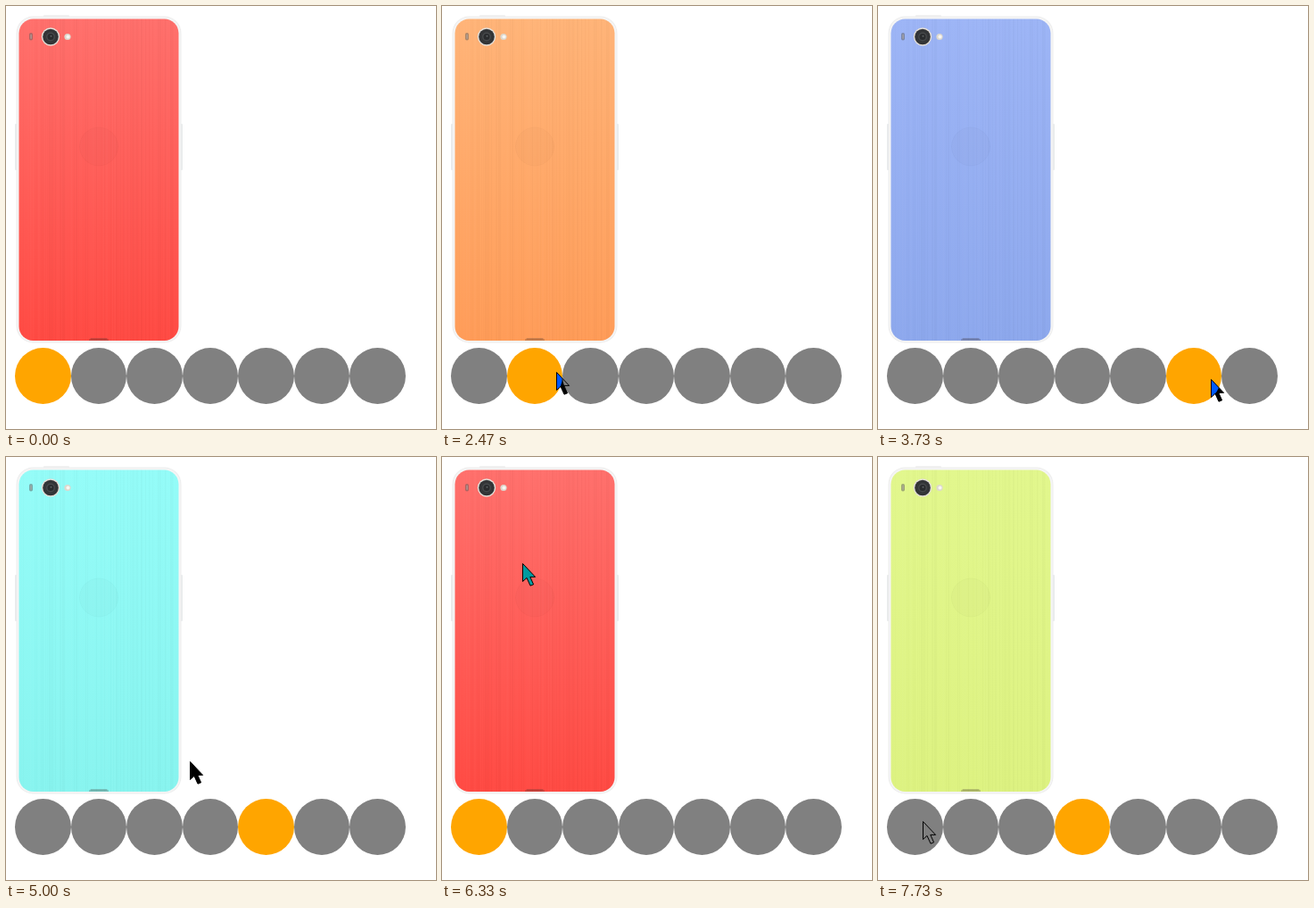
Write an HTML page with a canvas that moves like this. It is 482 px wide and 474 px high and loops after 8 s.

```html
<!DOCTYPE html>
<html lang="en">
<head>
<meta charset="utf-8">
<title>Phone colours</title>
<style>
  html, body { margin: 0; width: 100%; height: 100%; overflow: hidden; background: #fff; }
  canvas { display: block; }
</style>
</head>
<body>
<canvas id="stage" width="482" height="474"></canvas>
<script>
const ctx = document.getElementById('stage').getContext('2d');
const LOOP = 8000, FPS = 15, TICKS = LOOP * FPS / 1000;

// Back cover: top colour, bottom colour
const covers = [
  ['#ff706c', '#ff4a43'],
  ['#ffb478', '#ff9c58'],
  ['#ffdb76', '#ffd362'],
  ['#e2f78d', '#ddf281'],
  ['#94fcf8', '#88f4ef'],
  ['#9db5f6', '#8da8ed'],
  ['#cfaaf2', '#b892e6']
];

const clicks = [
  { at: 0, index: 0 },
  { at: 37, index: 1 },
  { at: 45, index: 2 },
  { at: 56, index: 5 },
  { at: 68, index: 4 }
];
const slideshow = { from: 85.3, every: 4.4, steps: 6 };

// The pointer enters here and eases from one stop to the next
const entry = { at: 14, x: 154, y: 452 };
const moves = [
  { from: 14, to: 17, x: 73, y: 200 },
  { from: 17, to: 20, x: 101, y: 37 },
  { from: 20, to: 31.4, x: 128, y: 410 },
  { from: 37, to: 41, x: 166, y: 411 },
  { from: 45, to: 52, x: 373, y: 418 },
  { from: 57, to: 62, x: 223, y: 423 },
  { from: 62, to: 65, x: 261, y: 417 },
  { from: 71, to: 75, x: 206, y: 341 },
  { from: 75, to: 83, x: 90, y: 119 },
  { from: 107, to: 116, x: 50, y: 408 }
];

const arrow = new Path2D('M.5 .5V20.5L5 16.4 9 25.2 12.6 23.8 8.8 15.4H14.6Z');
const clamp = (v, min, max) => Math.min(max, Math.max(min, v));
const smooth = k => k * k * (3 - 2 * k);

function rounded(x, y, w, h, r, fill) {
  ctx.beginPath();
  ctx.roundRect(x, y, w, h, r);
  ctx.fillStyle = fill;
  ctx.fill();
}

function oval(x, y, rx, ry, fill) {
  ctx.beginPath();
  ctx.ellipse(x, y, rx, ry, 0, 0, Math.PI * 2);
  ctx.fillStyle = fill;
  ctx.fill();
}

const disc = (x, y, r, fill) => oval(x, y, r, r, fill);

function drawGrooves() {
  for (let x = 15; x < 193; x++) {
    const noise = Math.abs(Math.sin(x * 12.9898) * 43758.5453) % 1 - 0.5;
    const tone = noise < 0 ? 0 : 255;
    ctx.fillStyle = `rgba(${tone},${tone},${tone},${Math.abs(noise) * 0.04})`;
    ctx.fillRect(x, 14, 1, 362);
  }
}

function drawCamera() {
  disc(50, 34.5, 10.2, '#e4dfd8');
  disc(50, 34.5, 8.8, '#333537');
  disc(50, 34.5, 5, '#45484a');
  disc(50, 34.5, 3.5, '#292b2d');
  disc(50.5, 33.8, 1, '#5c6062');
  disc(69, 34.5, 3.6, '#ddd8ce');
  disc(69.5, 34.5, 2, '#f8f6f2');
  rounded(26, 30, 4, 8.5, 2, 'rgba(90,90,90,.5)');
  rounded(27.2, 31.5, 1.8, 5.5, 1, 'rgba(180,170,165,.6)');
}

function drawPhone([top, bottom]) {
  rounded(42, 10, 29, 4, 1, '#f1f1f1');
  rounded(10, 132, 3, 52, 1, '#e9ebec');
  rounded(195, 132, 3, 52, 1, '#e9ebec');
  rounded(11.5, 11.5, 185, 366, 19, '#ededed');
  rounded(12.5, 12.5, 183, 364, 18, '#f5f5f5');

  const shade = ctx.createLinearGradient(0, 14, 0, 375);
  shade.addColorStop(0, top);
  shade.addColorStop(1, bottom);
  ctx.save();
  rounded(14.5, 14.5, 179, 360.5, 16, shade);
  ctx.clip();
  drawGrooves();
  ctx.restore();

  disc(104, 157.5, 21.5, 'rgba(0,0,0,.015)');
  ctx.strokeStyle = 'rgba(0,0,0,.025)';
  ctx.lineWidth = 1;
  ctx.stroke();

  drawCamera();
  rounded(93, 372.5, 22, 2.5, [2, 2, 0, 0], 'rgba(60,45,40,.25)');
  rounded(95, 372.5, 18, 1, 0, 'rgba(50,40,35,.25)');
}

function drawButtons(active) {
  const edge = i => Math.round(10 + 62.5 * i);
  covers.forEach((_, i) => {
    const left = edge(i), right = edge(i + 1);
    oval((left + right) / 2, 414.5, (right - left) / 2, 31.5,
      i === active ? '#ffa500' : '#808080');
  });
}

function pointerAt(tick) {
  let { x, y } = entry;
  for (const move of moves) {
    const k = smooth(clamp((tick - move.from) / (move.to - move.from), 0, 1));
    x += (move.x - x) * k;
    y += (move.y - y) * k;
  }
  return [Math.floor(x), Math.floor(y)];
}

function drawPointer(tick) {
  if (tick < entry.at) return;
  ctx.save();
  ctx.translate(...pointerAt(tick));
  // The pointer inverts whatever lies under it
  ctx.globalCompositeOperation = 'difference';
  ctx.fillStyle = '#fff';
  ctx.fill(arrow);
  ctx.globalCompositeOperation = 'source-over';
  ctx.strokeStyle = '#000';
  ctx.lineWidth = 1;
  ctx.stroke(arrow);
  ctx.restore();
}

function activeAt(tick) {
  const { from, every, steps } = slideshow;
  const passed = clamp(Math.floor((tick - from) / every) + 1, 0, steps);
  const clicked = clicks.findLast(c => c.at <= tick).index;
  return (clicked + passed) % covers.length;
}

function draw(ms) {
  // A few ms of slack keep rounded tick times on the right side
  const tick = Math.floor((ms % LOOP + 4) * FPS / 1000) % TICKS;
  const active = activeAt(tick);
  ctx.fillStyle = '#fff';
  ctx.fillRect(0, 0, 482, 474);
  drawPhone(covers[active]);
  drawButtons(active);
  drawPointer(tick);
}

const start = performance.now();
function loop() {
  draw(performance.now() - start);
  requestAnimationFrame(loop);
}
loop();
</script>
</body>
</html>
```
